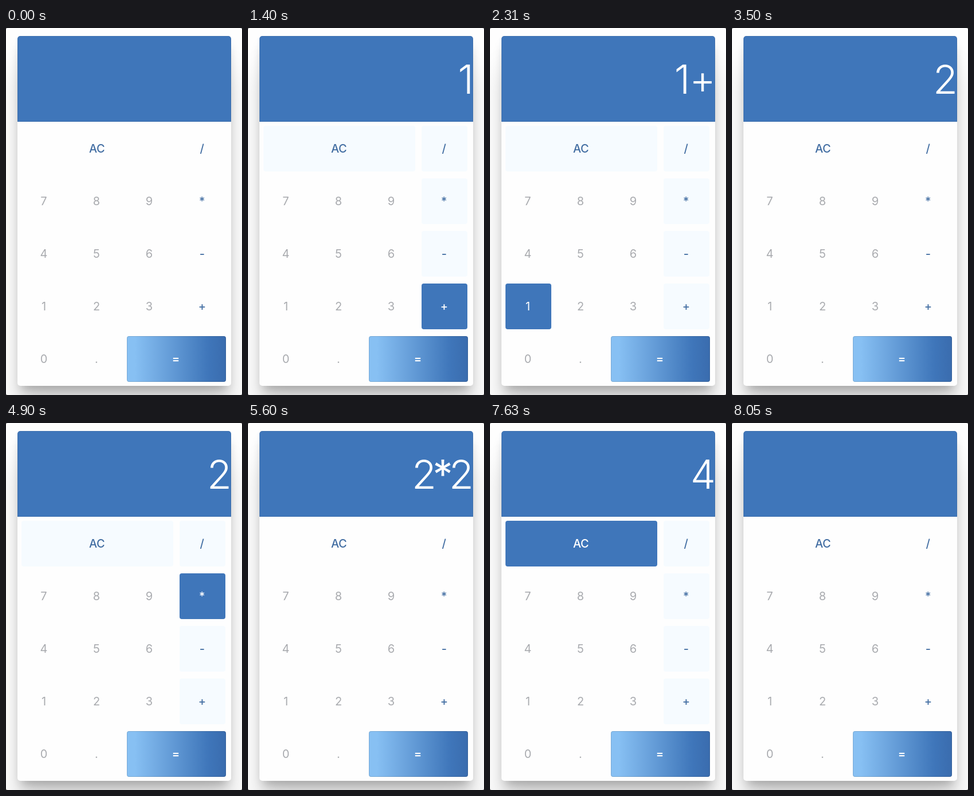
These frames come from a looping animation (412x642 px, 9.1 s). An HTML page:

```html
<!DOCTYPE html>
<html lang="en">
<head>
<meta charset="utf-8">
<title>Calculator</title>
<style>
  html, body { margin: 0; width: 412px; height: 642px; overflow: hidden; }
  html { background: #777; }
  body {
    position: relative; background: #fefefe; border-radius: 3px;
    font: 20px Inter, sans-serif; font-variant-ligatures: none;
  }
  #card {
    position: absolute; left: 20px; top: 14px; width: 373px; height: 612px;
    border-radius: 5px; background: #fefefe;
    box-shadow: 0 60px 50px rgba(0,0,0,.13), 0 13px 18px -6px rgba(0,0,0,.28);
  }
  #display {
    height: 150px; border-radius: 5px 5px 0 0; background: #3f76ba; color: #fff;
    box-shadow: inset 0 0 0 1px rgba(0,0,0,.07);
  }
  #value {
    position: absolute; right: 0; top: 33px; line-height: 85px;
    font-size: 70px; font-weight: 300; letter-spacing: -1px; white-space: pre;
  }
  #value b { margin: 0 -5.5px; font-weight: 400; }
  .key {
    position: absolute; height: 80px; line-height: 80px; border-radius: 4px;
    text-align: center; color: #a9abaf; text-indent: -2px;
  }
  .op { color: #446fa3; font-weight: 500; letter-spacing: -.6px; }
  .tint .op { background: #f6fbff; }
  .key.equals {
    color: #fff; font-weight: 600;
    background: linear-gradient(90deg, #87c0f3 8%, #3f76ba 82%, #3a6cae);
    box-shadow: inset 0 0 0 1px rgba(0,0,0,.12);
  }
  .key.pressed { background: #3f76ba; color: #fff; }
</style>
</head>
<body>
<div id="card"><div id="display"><span id="value"></span></div></div>
<script>
const LOOP = 9100;
const card = document.getElementById('card');
const value = document.getElementById('value');
const keys = {};

function addKey(label, col, row, span = 1, kind = '') {
  const el = document.createElement('div');
  el.className = 'key ' + kind;
  el.textContent = label;
  el.style.left = Math.floor(7 + col * 92.33) + 'px';
  el.style.top = 157 + row * 92 + 'px';
  el.style.width = Math.round(span * 92.33 - 12) + 'px';
  keys[label] = el;
  card.append(el);
}

addKey('AC', 0, 0, 3, 'op');
['789', '456', '123', '0.'].forEach((row, r) =>
  [...row].forEach((label, c) => addKey(label, c, r + 1)));
[...'/*-+'].forEach((label, r) => addKey(label, 3, r, 1, 'op'));
addKey('=', 2, 4, 2, 'equals');

// key, pressed at, released at, tint gone at, display after release
const presses = [
  ['1', 560, 700, 910, '1'],
  ['+', 1400, 1540, 1750, '1+'],
  ['1', 2240, 2380, 2870, '1+1'],
  ['=', 3080, 3220, 3500, '2'],
  ['*', 4900, 5040, 5180, '2*'],
  ['2', 5530, 5600, 5600, '2*2'],
  ['=', 6090, 6230, 6370, '4'],
  ['AC', 7490, 7700, 7910, '']
];

function render(t) {
  let text = '', pressed = null, tint = false;
  for (const [key, down, up, settled, result] of presses) {
    if (t >= up) text = result;
    if (t >= down && t < up) pressed = key;
    if (t >= down && t < settled) tint = true;
  }
  value.innerHTML = text.replace('*', '<b>*</b>');
  card.classList.toggle('tint', tint);
  for (const label in keys) keys[label].classList.toggle('pressed', label === pressed);
}

const start = performance.now();
function frame() {
  render((performance.now() - start) % LOOP);
  requestAnimationFrame(frame);
}
render(0);
requestAnimationFrame(frame);
</script>
</body>
</html>
```
